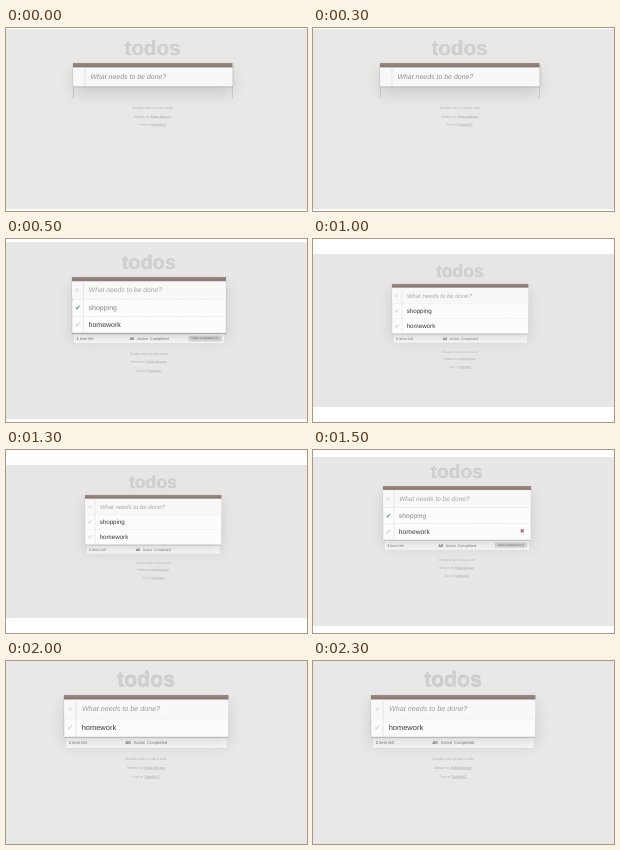
Write an HTML page that moves like this. It is 301 by 183 pixels and loops after 2.5 s.

```html
<!DOCTYPE html>
<html lang="en">
<head>
<meta charset="utf-8">
<title>todos</title>
<style>
html, body { margin: 0; width: 100%; height: 100%; overflow: hidden; background: #fff; }
body { position: relative; font-family: "Liberation Sans", Arial, sans-serif; color: #3a3a3a;
  text-rendering: geometricPrecision; }
.scene { position: absolute; left: 0; width: 301px; visibility: hidden; }
.scene.on { visibility: visible; }
.app { position: absolute; width: 550px; transform-origin: 0 0; }
.app div { position: absolute; box-sizing: border-box; }
.text { line-height: 0; white-space: nowrap; }
.mid { transform: translateX(-50%); }
.title { font-weight: bold; color: #d0d0d0; text-shadow: -1px -1px #c6c6c6; }
.paper { width: 550px; height: 50px; background: #f5f5f5; box-shadow:
  0 1px 1px rgba(0,0,0,.3), 0 6px 0 -3px rgba(255,255,255,.8), 0 7px 1px -3px rgba(0,0,0,.3),
  0 43px 0 -6px rgba(255,255,255,.8), 0 44px 2px -6px rgba(0,0,0,.2); }
.sheet { left: 6px; width: 538px; height: 37px;
  background: linear-gradient(rgba(255,255,255,.1), rgba(255,255,255,.55)); }
.panel { width: 550px; top: 0; background: #fcfcfc; border: 1px solid #ccc;
  box-shadow: 0 2px 6px rgba(0,0,0,.2), 0 25px 50px rgba(0,0,0,.12); }
.bar { width: 550px; height: 15px; border-bottom: 1px solid #6c615c;
  background: linear-gradient(#9d8b83, #84766f); }
.input { top: 15px; width: 548px; left: 1px; height: 65px; background: #f8f8f8; }
.rule { top: 15px; left: 39px; width: 4px; border: solid; border-width: 0 1px; }
.line { left: 0; width: 550px; border-top: 1px dotted #bbb; }
.side { top: 80px; height: 43px; width: 550px; border: solid #b5b5b5; border-width: 0 2px; }
.mark { font-family: "DejaVu Sans", sans-serif; }
.button { left: 416px; width: 119px; height: 20px; border-radius: 3px; background: rgba(0,0,0,.13); }
.info { color: #a8a8a8; text-shadow: 0 1px rgba(255,255,255,.7); }
.info u { color: #9c9c9c; }
</style>
</head>
<body>
<script>
const STEP = 500;
const open = name => ({ name });
const done = name => ({ name, done: true });

// x, y, scale place the app; top and bottom bound the grey page
const scenes = [
  { x: 67.3, y: 35.2, scale: .29, top: 1, bottom: 181, page: '#e8e8e7', hint: '#909090', rule: '#d5d5d5', items: [] },
  { x: 66.2, y: 37.6, scale: .28, top: 3, bottom: 180, page: '#e7e7e7', hint: '#a5a5a5', rule: '#f2c4c8',
    items: [done('shopping'), open('homework')] },
  { x: 78.5, y: 44.7, scale: .248, top: 15, bottom: 168, page: '#e6e6e6', hint: '#a8a8a8', rule: '#ead8d8',
    items: [open('shopping'), open('homework')] },
  { x: 70.2, y: 36, scale: .269, top: 7, bottom: 176, page: '#e7e7e7', hint: '#a5a5a5', rule: '#dcd6d6',
    items: [done('shopping'), open('homework')], hover: 1 },
  { x: 58, y: 33.6, scale: .299, top: 0, bottom: 183, page: '#e8e8e8', hint: '#9c9c9c', rule: '#d8d5d5',
    items: [open('homework')] },
];

const box = (cls, css = '') => `<div class="${cls}" style="${css}"></div>`;
// y is the vertical middle of the line
const text = (str, x, y, size, css = '', cls = '') =>
  `<div class="text ${cls}" style="left:${x}px;top:${y}px;font-size:${size}px;${css}">${str}</div>`;

function footer(items, end) {
  const left = items.filter(item => !item.done).length;
  const y = end + 20;
  let html = box('sheet', `top:${end + 1}px`) +
    text(`<b>${left}</b> item${left === 1 ? '' : 's'} left`, 16, y, 14, 'color:#777') +
    text('<b>All</b>', 205, y, 14, 'color:#555') +
    text('Active', 233, y, 14, 'color:#777') +
    text('Completed', 278, y, 14, 'color:#777');
  if (left < items.length) {
    html += box('button', `top:${end + 10}px`) +
      text(`Clear completed (${items.length - left})`, 475, y, 11, 'color:#666', 'mid');
  }
  return html;
}

function row(item, i, hover) {
  const y = 110 + 60 * i;
  const style = item.done ? 'color:#8c8c8c;text-decoration:line-through #aaa 1px' : '';
  return box('line', `top:${y - 30}px`) +
    text('✔', 21, y, 25, `color:${item.done ? '#459486' : '#cfcfcf'}`, 'mark mid') +
    text(item.name, 59, y, 25, style) +
    (hover ? text('✖', 518, y, 22, 'color:#a0686b', 'mark mid') : '');
}

function app({ items, hint, rule, hover }) {
  const end = 80 + 60 * items.length;
  const info = (str, i) => text(str, 275, end + 74 + 30 * i, 12, '', 'info mid');
  return text('todos', 275, -51, 71, '', 'title mid') +
    (items.length ? box('paper', `top:${end - 50}px`) : box('side')) +
    box('panel', `height:${end}px`) + box('input') + box('bar') +
    (items.length ? text('»', 21, 47, 28, 'color:#cfcfcf;transform:translateX(-50%) rotate(90deg)') : '') +
    text('What needs to be done?', 60, 47.5, 24, `font-style:italic;color:${hint}`) +
    items.map((item, i) => row(item, i, hover === i)).join('') +
    box('rule', `height:${end - 15}px;border-color:${rule}`) +
    (items.length ? footer(items, end) : '') +
    ['Double-click to edit a todo', 'Written by <u>Edda Morsen</u>', 'Part of <u>TodoMVC</u>'].map(info).join('');
}

const nodes = scenes.map(scene => {
  const { x, y, scale, top, bottom, page } = scene;
  const node = document.createElement('div');
  node.className = 'scene';
  node.style.cssText = `top:${top}px;height:${bottom - top}px;background:${page}`;
  node.innerHTML =
    `<div class="app" style="left:${x}px;top:${y - top}px;transform:scale(${scale})">${app(scene)}</div>`;
  document.body.append(node);
  return node;
});

function draw() {
  const current = Math.floor(performance.now() / STEP) % nodes.length;
  nodes.forEach((node, i) => node.classList.toggle('on', i === current));
  requestAnimationFrame(draw);
}
draw();
</script>
</body>
</html>
```
